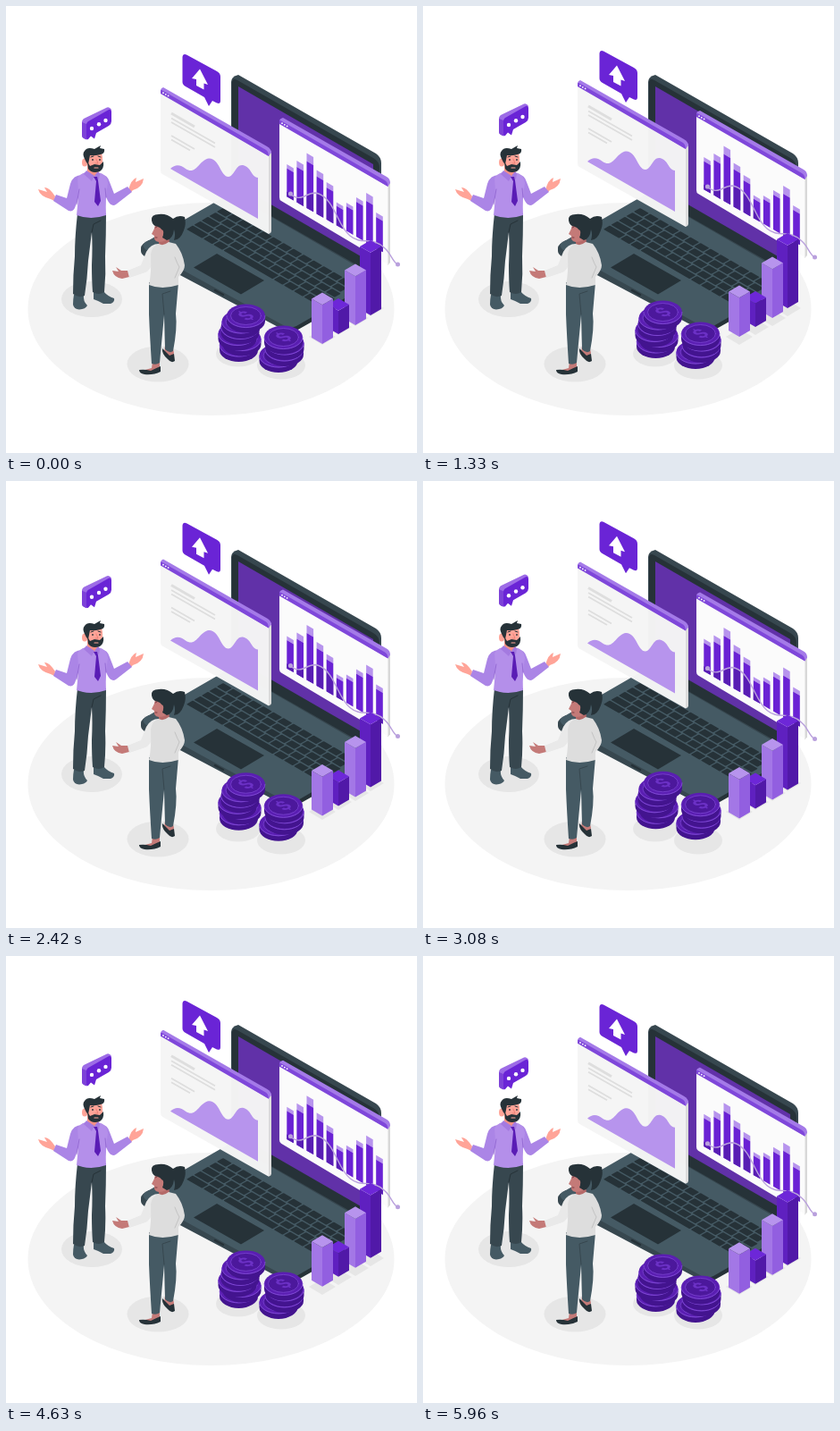
Recreate the animation shown at these times as an HTML page. Size 460 by 500 pixels, loop 6 s.

```html
<!DOCTYPE html>
<html lang="en">
<head>
<meta charset="utf-8">
<title>Business analytics</title>
<style>
  html, body { margin: 0; width: 100%; height: 100%; overflow: hidden; background: #fff; }
  svg { display: block; width: 100vw; height: 100vh; }
  text { font-family: Roboto, Arial, sans-serif; font-weight: 700; }
</style>
</head>
<body>
<svg viewBox="0 0 460 500" fill="none" stroke-linecap="round" stroke-linejoin="round">
  <defs>
    <clipPath id="underLine">
      <path d="M310 205 318 210C331 222 338 205 350 210C368 217 371 246 385 257C398 268 410 257 424 271V300H310Z"/>
    </clipPath>
  </defs>

  <ellipse cx="229.5" cy="339" rx="205" ry="119" fill="#f4f4f4"/>
  <g fill="#e6e6e6">
    <ellipse cx="96" cy="328" rx="34" ry="20"/>
    <ellipse cx="170" cy="400.500" rx="34.500" ry="20"/>
    <ellipse cx="260" cy="389" rx="25" ry="14.500"/>
    <ellipse cx="308" cy="402" rx="27" ry="15.500"/>
    <path d="M154 262 320 356 322 368 166 282Z"/>
    <g id="barShadows"></g>
  </g>

  <!-- laptop -->
  <g>
    <path d="M317 357 419 304V310L325 363Q318 366 312 363Z" fill="#263238"/>
    <path d="M160 262Q151 266 151 271V274Q151 278 157 281L312 363Q318 366 320 364V356Z" fill="#37474f"/>
    <path d="M252 209 160 262Q149 267 157 273L312 358Q318 361 325 358L419 304Z" fill="#455a64"/>
    <path d="M234 318 243 323" stroke="#263238" stroke-width="2.500"/>
    <path d="M236 277 289 307 263 322.500 210 292.500Z" fill="#263238"/>
    <g id="keys" transform="matrix(.866 .5 -.866 .5 243 226)" fill="#263238"></g>
    <path d="M252 210V85Q252 79 260 77L414 165Q420 169 420 176V307Z" fill="#37474f"/>
    <path d="M253 210V86Q253 80 259 83L411 170Q418 174 418 181V304Z" fill="#263238"/>
    <path d="M260 90 411 177V288L260 201Z" fill="#6131a8"/>
  </g>

  <!-- document window -->
  <g class="fast">
    <path d="M294 165 297 162V252Q297 254 294 255Z" fill="#dcdcdc"/>
    <path d="M173 96 294 166V255L175 188Q173 187 173 184Z" fill="#f5f5f5" fill-opacity=".98"/>
    <path d="M173 95Q173 92 176 91L292 157Q297 160 297 164L294 168Z" fill="#a47ae8"/>
    <path d="M173 98V95Q173 93 176 95L291 161Q294 163 294 168Z" fill="#7f47da"/>
    <g fill="#fff"><circle cx="176" cy="97.200" r=".9"/><circle cx="178.800" cy="98.800" r=".9"/><circle cx="181.600" cy="100.400" r=".9"/></g>
    <g stroke="#dedede" stroke-width="1.800" stroke-linecap="butt">
      <path d="M185 120 211 135" stroke-width="3"/>
      <path d="M185 125.500 234 153.500M185 130 234 158M185 145 211 160M185 149.500 206 161.500"/>
    </g>
    <path d="M184 182C190 176 196 178 201 182C213 190 216 172 227 170.500C239 170 240 191 249 191C256 190 257 177 265 178C275 180 274 191 282 192V238Z" fill="#b794ed"/>
  </g>

  <!-- chart window -->
  <g class="fast">
    <path d="M427 199 430 196V287L427 290Z" fill="#d8d8d8"/>
    <path d="M306 130 427.500 200V289L308 218Q306 217 306 214Z" fill="#fbfbfb"/>
    <path d="M306 129Q306 126 310 125L426 191Q430 193 430 198L427.500 202Z" fill="#a47ae8"/>
    <path d="M306 132V129Q306 127 309 129L424 195Q427.500 197 427.500 202Z" fill="#7f47da"/>
    <g fill="#fff"><circle cx="309" cy="131.200" r=".9"/><circle cx="311.800" cy="132.800" r=".9"/><circle cx="314.600" cy="134.400" r=".9"/></g>
    <g id="caps" fill="#b794ed"></g>
    <g id="columns" fill="#6a22d4"></g>
    <g id="columnsDark" fill="#581db4" clip-path="url(#underLine)"></g>
    <path d="M318 210C331 222 338 205 350 210C368 217 371 246 385 257C398 268 410 257 424 271C431 277 432 285 438 289" stroke="#b9a0dd" stroke-width="1.400"/>
    <g fill="#b9a0dd"><circle cx="318.500" cy="210" r="2.600"/><circle cx="438.500" cy="289" r="2.500"/></g>
  </g>
  <g class="fast" id="blocks"></g>

  <g class="slow" id="coins"></g>

  <!-- arrow bubble -->
  <g class="slow">
    <path d="M197.500 57Q198 53 202 54.500L236 73Q240 75 240 79V106Q240 110 236 108.500L231 106 227 112 222 102 201 90Q197.500 88 197.500 85Z" fill="#6a24d6"/>
    <path d="M217 70.500 226 88 221.500 86.500V93.500L213 89V82L208 81Z" fill="#fff"/>
  </g>

  <!-- chat bubble -->
  <g class="slow">
    <path d="M85 130Q85 127 88 125.500L113 113.500Q116 112.500 118 116L91 133V149.500L87 148Q85 147 85 145Z" fill="#9d6ce6"/>
    <path d="M85 130 90 132V149.500L87 148Q85 147 85 145Z" fill="#7d42d8"/>
    <path d="M90 133Q90 130 93 128.500L115 116Q118 115 118 118V129Q118 132 115 134L101 142 99 148.500 95 145.500 92 149Q90 150 90 147Z" fill="#6a24d6"/>
    <g fill="#fff"><circle cx="96" cy="137" r="2.200"/><circle cx="104" cy="132.300" r="2.200"/><circle cx="111.500" cy="128" r="2.200"/></g>
  </g>

  <!-- man -->
  <g>
    <path d="M76 323Q75 328 75 334Q76 339 82 339.500Q89 339 91 335Q86 330 87 323Z" fill="#455a64"/>
    <path d="M98 320V328Q104 330 109 333H117Q122 331 121 327Q114 325 109 319Z" fill="#455a64"/>
    <path d="M80 232Q77 258 77 280Q75 300 75 322Q81 327 88 324Q91 305 92 285L96 253Q97 270 96 290Q96 307 97 320Q104 324 110 320Q112 300 111 280Q112 255 112 232Z" fill="#37474f"/>
    <path d="M96 253 98 244 106 240" stroke="#263238"/>
    <path d="M55 213Q48 202 43 203L46 208 36 205Q38 213 50 216L54 218Z" fill="#ffa498"/>
    <path d="M137 206Q140 194 146 192L145 197 154 193Q153 203 142 206L139 209Z" fill="#ffa498"/>
    <path d="M85 189Q75 189 72 199L68 215 56 211 53 218 70 229Q76 231 78 223L83 208Z" fill="#ab85e6"/>
    <path d="M106 188Q114 189 116 197L121 210 136 202 141 208 123 222Q118 225 114 218L108 205Z" fill="#ab85e6"/>
    <path d="M89 186Q82 188 80 193Q82 210 79 234Q95 240 112 234Q111 215 114 198Q113 188 103 186Z" fill="#b48fea"/>
    <path d="M82 205 79 222M111 204 112 214" stroke="#8d62cf" stroke-width=".8"/>
    <path d="M91 179V185L99 191 104 185V180Z" fill="#f28f86"/>
    <path d="M90 184 87 188 96 196 99 190 104 194 105 188 103 185 99 190Z" fill="#a47ae0"/>
    <path d="M98 191 102 191 103 195 106 218 103 224 99 219 101 196Z" fill="#5a1cb5"/>
    <path d="M90 164Q91 160 99 160Q108 161 108 169Q109 181 103 184Q94 186 90 177Z" fill="#ffa498"/>
    <ellipse cx="88" cy="175" rx="3" ry="4.500" fill="#ffa498"/>
    <path d="M91 174 94 179 99 177 105 178 109 174Q110 182 105 185Q96 188 92 182Z" fill="#263238"/>
    <path d="M88 171Q85 165 88 162Q91 157 99 160L106 156 105 159 110 160Q111 165 106 166Q98 168 94 167L92 177 90 175Z" fill="#263238"/>
    <path d="M95 169 98 168M103 168 106 169" stroke="#263238"/>
    <circle cx="97" cy="172" r=".9" fill="#263238"/><circle cx="105" cy="172" r=".9" fill="#263238"/>
    <path d="M101 171 103 176 100 176" stroke="#e5786f" stroke-width=".8"/>
    <path d="M99 181H103" stroke="#ffa498" stroke-width="1.200"/>
  </g>

  <!-- woman -->
  <g>
    <path d="M164 398 163 405 152 408 166 411 172 406V398ZM178 380 177 387 186 395 188 388 186 380Z" fill="#c47a78"/>
    <path d="M149 407Q155 406 162 408Q168 405 173 403V409Q165 413 155 412Q149 411 149 407ZM175 383 183 391 188 389 189 397Q185 400 181 395Q174 389 175 383Z" fill="#263238"/>
    <path d="M160 309Q160 328 160 345Q161 370 163 400Q168 402 172 399L177 346 178 384Q183 389 187 386Q192 360 190 344L193 309Z" fill="#455a64"/>
    <path d="M177 345 175 322 184 319" stroke="#37474f"/>
    <path d="M138 296 129 296 123 292 126 297 119 296Q121 304 130 305L138 303Z" fill="#c47a78"/>
    <path d="M171 256V268Q177 272 183 267L182 254Z" fill="#b56a69"/>
    <path d="M171 266Q162 266 157 275L151 290 136 296 138 304 156 298Q161 296 165 286Z" fill="#e9e9e9"/>
    <path d="M171 266Q163 269 162 278Q163 298 160 312Q174 318 193 312V303Q200 296 200 290Q198 276 190 266L182 264Q176 269 171 266Z" fill="#dddddd"/>
    <path d="M189 281Q192 289 194 292L189 304" stroke="#c3c3c3"/>
    <path d="M168 240 166 249 163 255 166 257Q165 263 171 264Q181 264 183 255L181 239Z" fill="#c47a78"/>
    <path d="M163 240Q162 233 171 233Q180 232 187 238Q193 233 200 236Q202 244 199 251Q195 262 188 262Q190 255 188 250Q187 260 180 262L175 259 176 256Q175 248 170 247Q164 246 163 240Z" fill="#263238"/>
    <ellipse cx="174" cy="253.500" rx="2.200" ry="3.300" fill="#c47a78"/>
    <path d="M167 248 169 247M167 259H169" stroke="#7d3f45"/>
  </g>
</svg>
<script>
const SLOPE = 0.577, LIFT = 9, FPS = 24;
const put = (id, markup) => { document.getElementById(id).innerHTML = markup; };
const poly = (points, fill = "") =>
  `<polygon points="${points.join(" ")}"${fill && ` fill="${fill}"`}/>`;

// Keyboard, laid out flat and projected by the group matrix
const key = (x, y, width) => `<rect x="${x}" y="${y}" width="${width}" height="8.2" rx="1"/>`;
let keys = "";
for (let row = 0; row < 5; row++) {
  const shift = row * 2.2;
  for (let col = 0; col < 13; col++) {
    if (row === 4 && col > 2 && col < 8) continue;
    keys += key(col * 13 + (col && shift), row * 9.8, col ? 11.4 : 11.4 + shift);
  }
}
put("keys", keys + key(47.8, 39.2, 63.4));

// Columns on the chart window
const column = (x, top, bottom) => poly([
  [x, top], [x + 7.6, top + 7.6 * SLOPE], [x + 7.6, bottom + 7.6 * SLOPE], [x, bottom]]);
const tops = [177, 173, 164.5, 183.5, 197, 219.5, 220, 214, 209, 231];
const caps = [4.5, 7, 9, 7, 6, 4, 4, 5, 9, 5];
let capMarkup = "", columnMarkup = "";
tops.forEach((top, i) => {
  const x = 314.3 + i * 11.1;
  capMarkup += column(x, top, top + caps[i]);
  columnMarkup += column(x, top + caps[i], 213 + (x - 314) * SLOPE);
});
put("caps", capMarkup);
put("columns", columnMarkup);
put("columnsDark", columnMarkup);

// Isometric blocks
const LIGHT = ["#b794ed", "#a377e6", "#925fe0"];
const DARK = ["#6d27d8", "#5f20c0", "#5119a8"];
const blocks = [
  [408, 262, 346, DARK], [391, 288.5, 357, LIGHT],
  [372, 327, 367, DARK], [354, 320.5, 378, LIGHT]
];
const W = 12, H = 6.9;
put("blocks", blocks.map(([x, top, foot, [lid, left, right]]) =>
  poly([[x - W, top + H], [x, top + 2 * H], [x, foot], [x - W, foot - H]], left) +
  poly([[x + W, top + H], [x, top + 2 * H], [x, foot], [x + W, foot - H]], right) +
  poly([[x, top], [x + W, top + H], [x, top + 2 * H], [x - W, top + H]], lid)
).join(""));
put("barShadows", blocks.map(([x, , foot]) =>
  poly([[x, foot - 17], [x + 15, foot - 8], [x, foot + 1], [x - 15, foot - 8]])).join(""));

// Coin stacks, bottom coin first
const coin = ([x, y]) => `<g transform="translate(${x} ${y})">
  <path d="M-21.500 0V6A21.500 13 0 0 0 21.500 6V0Z" fill="#43148f"/>
  <path d="M-21 3A21.500 13 0 0 0 21 3" stroke="#5c25b8" stroke-width=".8"/>
  <ellipse rx="21.500" ry="13" fill="#5a1eb2"/>
  <path d="M-21.500 0A21.500 13 0 0 0 21.500 0" stroke="#8a55dc" stroke-width=".8"/>
  <ellipse rx="17" ry="10" fill="#4c189c" stroke="#7c44d2" stroke-width=".8"/>
  <text transform="matrix(.866 -.5 .866 .5 0 0)" x="0" y="7" font-size="20" text-anchor="middle" fill="#6c31c6">$</text>
</g>`;
put("coins", [
  [260.5, 379], [264, 372.5], [259, 366.5], [262, 359.5], [263, 353], [268.5, 346.5],
  [305, 391], [311.5, 384], [312, 377], [310.5, 370.5]
].map(coin).join(""));

// Constant-speed rise and fall
const rise = (time, period) => -LIFT * (1 - Math.abs(1 - 2 * (time % period) / period));
const fast = document.querySelectorAll(".fast");
const slow = document.querySelectorAll(".slow");
const move = (parts, y) => parts.forEach(part => part.setAttribute("transform", `translate(0 ${y.toFixed(3)})`));

function draw(ms) {
  const time = Math.floor(ms % 6000 * FPS / 1000 + 0.2) / FPS;
  move(fast, rise(time, 3));
  move(slow, rise(time, 6));
}
const start = performance.now();
function tick() {
  draw(performance.now() - start);
  requestAnimationFrame(tick);
}
tick();
</script>
</body>
</html>
```
